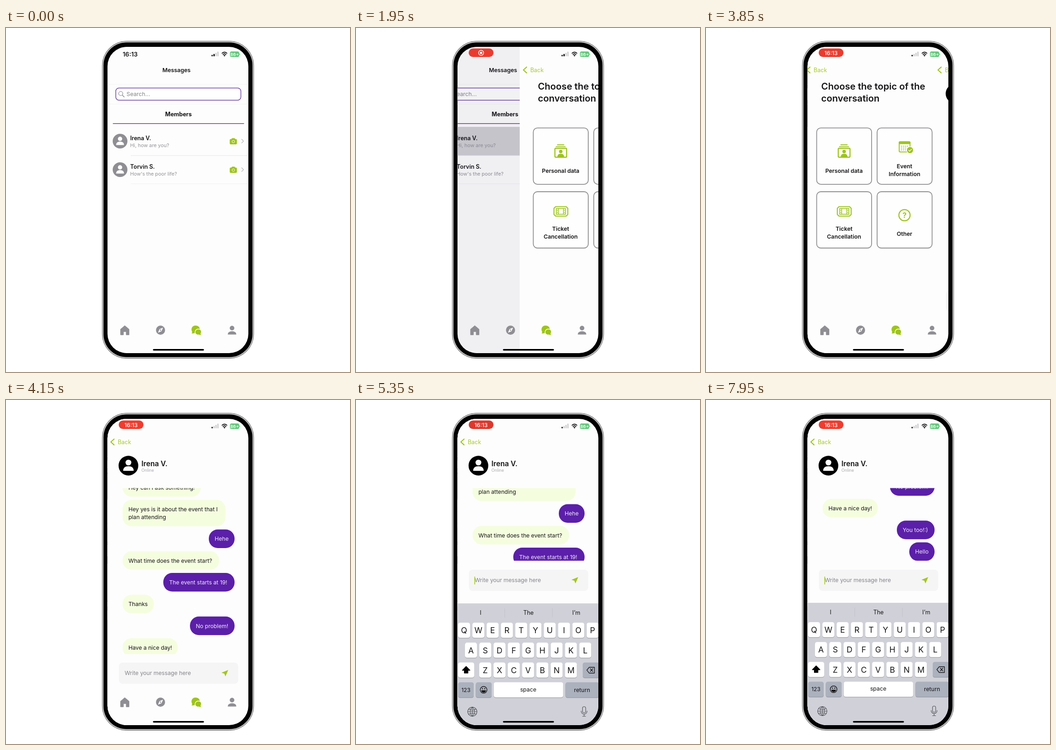
An HTML page for the animation above (8 s loop, 748x748 px).

```html
<!DOCTYPE html>
<html lang="en">
<head>
<meta charset="utf-8">
<title>Chat app demo</title>
<style>
  html, body { margin: 0; width: 100%; height: 100%; overflow: hidden; background: #fff; }
  svg { display: block; width: 100vw; height: 100vh; }
  text { font-family: Inter, Roboto, sans-serif; white-space: pre; }
</style>
</head>
<body>
<svg id="stage" viewBox="0 0 748 748"></svg>
<script>
const LOOP = 8000, STEP = 50, SCREEN_W = 306;
const GREEN = '#9ec41a', GRAY = '#8e8e93', PURPLE = '#5b1fa9', PAPER = '#fdfdfd', INK = '#151517';

// ---- markup helpers; text is placed by the vertical centre of its capitals ----
const text = (x, y, size, str, { fill = INK, weight = 400, anchor = 'start', id = '' } = {}) =>
  `<text id="${id}" x="${x}" y="${y + size * 0.36}" font-size="${size}" fill="${fill}" font-weight="${weight}" text-anchor="${anchor}">${str}</text>`;
const mid = (x, y, size, str, opts = {}) => text(x, y, size, str, { anchor: 'middle', ...opts });
const rect = (x, y, w, h, r, fill, extra = '') =>
  `<rect x="${x}" y="${y}" width="${w}" height="${h}" rx="${r}" fill="${fill}" ${extra}/>`;
const circle = (x, y, r, fill, extra = '') => `<circle cx="${x}" cy="${y}" r="${r}" fill="${fill}" ${extra}/>`;
const path = (d, fill, extra = '') => `<path d="${d}" fill="${fill}" ${extra}/>`;
const line = (d, color, width = 1) =>
  path(d, 'none', `stroke="${color}" stroke-width="${width}" stroke-linecap="round" stroke-linejoin="round"`);
const group = (id, body, extra = '') => `<g id="${id}" ${extra}>${body}</g>`;

const avatar = (x, y, scale, fill) => `<g transform="translate(${x} ${y}) scale(${scale})">
  ${circle(0, 0, 16, fill)}${circle(0, -5, 4.7, '#fff')}
  ${path('M-8.5 8.5c0-5.5 3.5-7.5 8.5-7.5s8.5 2 8.5 7.5z', '#fff')}</g>`;
const backButton = line('M235 85l-7 6.3 7 6.3', GREEN, 2.2) + text(243, 91.5, 12.4, 'Back', { fill: '#a6ca2c' });

// ---- message overview ----
function memberRow(y, name, note) {
  return avatar(248, y, 1, GRAY) +
    text(270, y - 7, 12.5, name, { weight: 600 }) +
    text(270, y + 9, 10.8, note, { fill: '#929297' }) +
    rect(486.5, y - 4.5, 15.5, 11.5, 2, GREEN) + rect(490.5, y - 6.5, 7.5, 4, 1.5, GREEN) +
    circle(494.3, y + 1, 2.8, 'none', 'stroke="#fff" stroke-width="1"') +
    line(`M512.5 ${y - 4}l4 4-4 4`, '#b9b9bd', 1.3);
}
const overview = rect(220, 41, 308, 667, 0, PAPER) +
  mid(370.7, 92, 12.4, 'Messages', { weight: 600 }) +
  line('M221 122.5H527M221 165.5H527', '#f3f3f4') +
  rect(238.7, 130.5, 272, 26.5, 7, '#fff', 'stroke="#6c45a8" stroke-width="1.5"') +
  circle(249.5, 142.5, 4.5, 'none', 'stroke="#85858a" stroke-width="1.2"') + line('M253 146l4 4', '#85858a', 1.3) +
  text(262, 144, 12.3, 'Search...', { fill: '#85858a' }) +
  mid(375, 187, 12.5, 'Members', { weight: 700 }) +
  line('M233 207.8H517', '#7338ae', 1.6) +
  rect(220, 215, 308, 62, 0, '#cfcfd4', 'id="highlight"') +
  memberRow(246, 'Irena V.', 'Hi, how are you?') +
  memberRow(308, 'Torvin S.', "How's the poor life?") +
  line('M272 277.3H525', '#e6e6e8') + line('M272 338.7H525', '#f0f0f1') +
  rect(220, 41, 308, 667, 0, '#1c0a3c', 'id="dim"');

// ---- topic picker ----
function card(x, y, icon, labels, labelY) {
  return rect(x + 1, y + 1, 119.5, 122.5, 9, '#fefefe', 'stroke="#909092" stroke-width="1.8"') + icon +
    labels.map((l, i) => mid(x + 60.5, labelY + i * 16.8, 12.3, l, { weight: 600 })).join('');
}
const personIcon = line('M302 254H316M299 257.8H319', GREEN, 1.8) +
  rect(296.5, 261.5, 25.5, 19.5, 2, 'none', `stroke="${GREEN}" stroke-width="2.4"`) +
  circle(309.2, 268.5, 3.8, GREEN) + path('M302 280c0-5 3-6.5 7.2-6.5s7.2 1.5 7.2 6.5z', GREEN);
let calendarIcon = rect(429, 247.5, 23.5, 22, 2, 'none', `stroke="${GREEN}" stroke-width="2"`) + rect(428, 246.5, 25.5, 6, 2, GREEN);
for (let i = 0; i < 12; i++) calendarIcon += rect(433 + i % 4 * 4.2, 256 + (i >> 2) * 4, 2, 2, 0, GREEN);
calendarIcon += circle(452.5, 265.5, 7.3, GREEN, 'stroke="#fff" stroke-width="1.2"') + line('M449.5 265.7l2.2 2.2 4-4.4', '#fff', 1.4);
let ticketIcon = line('M298 388.5H321L324.5 392V405.5L321 409H298L294.5 405.5V392Z', GREEN, 2.2) +
  rect(299.5, 392.5, 20, 12.5, 0, 'none', `stroke="${GREEN}" stroke-width="1.7"`) + line('M304 392.5V405M315 392.5V405', GREEN, 1.5);
for (const x of [301.8, 317.2]) ticketIcon += line(`M${x} 396.5h.01M${x} 401h.01`, GREEN, 2);
const otherIcon = circle(440.5, 407, 12.2, 'none', `stroke="${GREEN}" stroke-width="2.3"`) + mid(440.5, 407.2, 16, '?', { fill: GREEN, weight: 700 });

const topics = rect(220, 41, 308, 667, 0, PAPER) + backButton +
  text(259.5, 127, 20.1, 'Choose the topic of the', { weight: 600 }) +
  text(259.5, 153, 20.1, 'conversation', { weight: 600 }) +
  card(248.5, 216.3, personIcon, ['Personal data'], 311) +
  card(380, 216.3, calendarIcon, ['Event', 'Information'], 300.7) +
  card(248.5, 355, ticketIcon, ['Ticket', 'Cancellation'], 437) +
  card(380, 355, otherIcon, ['Other'], 447.5);

// ---- conversation: [own message, bubble width, lines] ----
const MESSAGES = [
  [0, 170, 'Hey can I ask something!'],
  [0, 224, 'Hey yes is it about the event that I', 'plan attending'],
  [1, 56, 'Hehe'], [0, 210, 'What time does the event start?'],
  [1, 155, 'The event starts at 19!'], [0, 68, 'Thanks'], [1, 97, 'No problem!'],
  [0, 120, 'Have a nice day!'], [1, 82, 'You too!:)'], [1, 55, 'Hello'],
];
let bubbleTop = 169.9;
const bubbles = MESSAGES.map(([own, w, ...lines], i) => {
  const h = 40.5 + (lines.length - 1) * 17, x = own ? 497 - w : 253.5, y = bubbleTop;
  bubbleTop += h + 6.8;
  return group('bubble' + i, rect(x, y, w, h, 19.5, own ? PURPLE : '#f5fddf') +
    lines.map((l, n) => text(x + 12.7, y + 20.5 + n * 17, 12.15, l, { fill: own ? '#f1e9fb' : INK })).join(''));
}).join('');
const chat = rect(220, 41, 308, 667, 0, PAPER) + backButton +
  avatar(266.2, 142.7, 1.34, '#000') +
  text(294.5, 138, 15.6, 'Irena V.', { weight: 600 }) + text(294.5, 153, 9, 'Online', { fill: '#a9a9ad' }) +
  `<g clip-path="url(#listClip)">${group('list', bubbles)}</g>` +
  group('composer', rect(245.5, 571, 259.5, 46, 8, '#f5f5f6') +
    text(258, 594, 12.2, '', { id: 'draft' }) +
    rect(257.3, 586, 1.8, 17, 0, '#acd030', 'id="caret"') +
    path('M468.5 593l14.7-6-6 14-2.5-6z', '#a3c61c'));

// ---- tab bar ----
const tabs = path('M249 655l9.3-7.8 9.3 7.8v12.2h-6.3v-7h-6v7H249z', GRAY, `stroke="${GRAY}" stroke-linejoin="round"`) +
  circle(336, 657, 9.9, GRAY) + path('M341.5 651.5l-3.3 7.7-7.7 3.3 3.3-7.7z', '#fff') + circle(336, 657, 1.4, GRAY) +
  path('M403.5 664c1.5-1.5 1.5-3 .8-4.5-2.8-6 1-12.5 7.7-12.5s9.5 4.5 9.5 8-3.5 8-9.5 8c-3 1-5.5 1.5-8.5 1z', GREEN) +
  path('M425.5 668.5c-3 .3-4.5-.3-6-1.2-4.5.7-8.5-2-8.5-6s3.3-6.8 7.3-6.8c6 0 8.5 6 5.5 10 0 1.5.5 2.7 1.7 4z', GREEN, `stroke="${PAPER}" stroke-width="1.4"`) +
  circle(491.5, 652.5, 5, GRAY) + path('M482.3 666.5c0-5 4-7 9.2-7s9.2 2 9.2 7z', GRAY);

// ---- keyboard ----
const KEY_GRAY = '#abb1bd', keys = {};
const keyCap = (x, y, w, fill, id = '') => rect(x, y + 1, w, 33, 4.5, '#8f9299') + rect(x, y, w, 33, 4.5, fill, `id="${id}"`);
[['qwertyuiop', 235, 483], ['asdfghjkl', 250, 526.3], ['zxcvbnm', 281, 569.5]].forEach(([row, x0, y]) =>
  [...row].forEach((ch, i) => keys[ch] = { x: x0 + i * 31.05, y }));
const letterCase = (id, change, size, dy) => group(id, Object.entries(keys).map(([ch, { x, y }]) =>
  mid(x, y + dy, size, change(ch))).join(''));
const letters = Object.values(keys).map(({ x, y }) => keyCap(x - 13, y, 26, '#fff')).join('') +
  letterCase('capitals', ch => ch.toUpperCase(), 17.5, 16.7) +
  letterCase('smallLetters', ch => ch, 19, 14.6);
const keyboard = rect(220, 441, 308, 270, 0, '#d0d1d8') +
  rect(323, 446, 104, 30, 5, '#e6e6ea', 'id="suggestionBox"') +
  line('M323.5 452V471M427 452V471', '#c2c3ca') +
  [271, 375, 479].map((x, i) => mid(x, 461.5, 12.5, '', { id: 'suggestion' + i })).join('') + letters +
  keyCap(222, 569.5, 35, '#fff', 'shiftKey') + path('M239.5 578l8.3 8.5h-4.3v6h-8v-6h-4.3z', '#000', 'id="shiftArrow" stroke="#000" stroke-width="1.3" stroke-linejoin="round"') +
  keyCap(493, 569.5, 36, KEY_GRAY) + line('M502 586l5-6h11.5v12.5H507zM509.5 583l5.5 6M515 583l-5.5 6', INK, 1.3) +
  keyCap(222, 612.5, 34, KEY_GRAY) + mid(239, 629, 12, '123') +
  keyCap(260.5, 612.5, 34.5, KEY_GRAY) + circle(277.5, 629, 7.3, 'none', `stroke="${INK}" stroke-width="1.4"`) +
  path('M272.5 630h10c0 6.5-10 6.5-10 0z', INK) + circle(275, 626.5, 1.2, INK) + circle(280, 626.5, 1.2, INK) +
  keyCap(299.5, 612.5, 151, '#fff') + mid(374.5, 628, 12.3, 'space') +
  keyCap(455.5, 612.5, 73, KEY_GRAY) + mid(491.5, 629, 12.3, 'return') +
  circle(253, 676.5, 10, 'none', 'stroke="#55575d" stroke-width="1.2"') +
  line('M243 676.5h20M253 666.5v20M253 666.5c-6.5 5-6.5 15 0 20M253 666.5c6.5 5 6.5 15 0 20M245 671c5 2.5 11 2.5 16 0M245 682c5-2.5 11-2.5 16 0', '#55575d', 1.1) +
  rect(492.5, 665.5, 7, 13.5, 3.5, 'none', 'stroke="#55575d" stroke-width="1.2"') +
  line('M489.5 675c0 9 13 9 13 0M496 682v4.5M492.5 686.5h7', '#55575d', 1.2) +
  group('popup', path('M-13 31v-26c0-7-10-6-10-13v-39q0-6 6-6h34q6 0 6 6v39c0 7-10 6-10 13v26q0 3-3 3h-20q-3 0-3-3z', '#fff', 'filter="url(#soft)"') +
    mid(0, -29.5, 30, '', { id: 'popupLetter' }));

// ---- status bar ----
const status = mid(270, 57, 13.4, '16:13', { weight: 600, id: 'clock' }) +
  group('pill', rect(245, 44.5, 54, 18.5, 9.2, '#ee3b2c', 'id="pillShape"') +
    mid(272, 54.2, 12.1, '16:13', { fill: '#fff', weight: 500, id: 'pillTime' }) +
    group('recordIcon', circle(272, 54, 5.5, 'none', 'stroke="#fff" stroke-width="1.4"') + circle(272, 54, 2.6, '#fff'))) +
  [3, 5, 7.5, 10].map((h, i) => rect(446.8 + i * 4.2, 61.5 - h, 2.9, h, 0.8, i ? '#cfcfd1' : INK, `id="bar${i}"`)).join('') +
  line('M469.8 54.8c3-3 7.5-3 10.5 0M472 57.5c1.8-1.7 4.3-1.7 6.2 0', INK, 1.9) + path('M472.8 59.5q2.2-1.8 4.5 0l-2.25 2.5z', INK) +
  rect(487, 51, 20, 12, 3.5, '#60c97a') + rect(507.7, 55, 1.3, 4, 0.6, '#60c97a') +
  mid(497, 57.2, 9.3, '86+', { fill: '#effbf0', weight: 700 });

document.getElementById('stage').innerHTML = `
  <defs>
    <clipPath id="screenClip">${rect(220.7, 41, 306.3, 666, 42, '#000')}</clipPath>
    <clipPath id="listClip"><rect id="listWindow" x="220" y="191.5" width="308" height="361"/></clipPath>
    <filter id="soft" x="-30%" y="-30%" width="160%" height="160%"><feDropShadow dx="0" dy="1" stdDeviation="1.5" flood-opacity=".25"/></filter>
  </defs>
  ${rect(209.3, 28.5, 329.4, 690, 53, '#8b8b8b', 'stroke="#737373" stroke-width="1"')}
  ${rect(211, 30.2, 326, 686.6, 51.5, 'none', 'stroke="#cacaca" stroke-width="1.8"')}
  ${rect(212, 31.5, 324, 684, 50, '#000')}
  <g clip-path="url(#screenClip)">
    ${group('overview', overview)}${group('topics', topics)}${group('chat', chat)}
    ${tabs}${group('keyboard', keyboard)}${status}
    ${rect(319.5, 698, 111, 3.6, 1.8, '#000')}
  </g>`;

// ---- timeline ----
const $ = id => document.getElementById(id);
const clamp = v => Math.min(1, Math.max(0, v));
const ramp = (t, from, to) => clamp((t - from) / (to - from));
const easeOut = p => 1 - (1 - p) ** 3;
const spring = t => t <= 0 ? 0 : 1 - (1 + 0.01826 * t) * Math.exp(-0.01826 * t);
const show = (id, on) => $(id).setAttribute('visibility', on ? 'inherit' : 'hidden');
const move = (id, x, y) => $(id).setAttribute('transform', `translate(${x} ${y})`);
const set = (id, attr, value) => $(id).setAttribute(attr, value);

const OPEN_TOPICS = 1848, OPEN_CHAT = 3840, FOCUS = 4940, SEND = 7350;
const TYPING = [
  [0, '', ['I', 'The', 'I’m']],
  [6150, 'H', ['“H”', 'He', 'Hey']],
  [6400, 'He', ['“He”', 'Hey', 'Hello']],
  [6550, 'Hel', ['“Hel”', 'He’ll', 'Hello']],
  [6700, 'Hell', ['“Hell”', 'Hello', 'He’ll']],
  [6950, 'Hello', ['“Hello”', 'Hello', 'Hellos']],
  [SEND, '', ['I', 'The', 'I’m']],
];
const typingAt = t => TYPING.findLast(([start]) => start <= Math.max(0, t));

function drawStatus(t) {
  const pill = ramp(t, 600, 850), icon = ramp(t, 900, 1100) * (1 - ramp(t, 3100, 3300));
  const glow = 0.5 + 0.5 * Math.cos((t - 4150) / 1900 * 2 * Math.PI);
  set('clock', 'opacity', 1 - pill);
  set('pill', 'opacity', pill);
  set('pillShape', 'fill', `rgb(${218 + 22 * glow},${55 + 5 * glow},${45 + glow})`);
  set('pillTime', 'opacity', 1 - icon);
  set('recordIcon', 'opacity', icon);
  set('bar1', 'fill', t < 3200 ? INK : '#cfcfd1');
}

function drawPages(t) {
  const first = spring(t - OPEN_TOPICS), second = easeOut(ramp(t, OPEN_CHAT, OPEN_CHAT + 300));
  show('highlight', t > 1650);
  set('dim', 'opacity', 0.1 * first);
  move('overview', -0.3 * SCREEN_W * first, 0);
  move('topics', SCREEN_W * (1 - first) - 0.3 * SCREEN_W * second, 0);
  move('chat', SCREEN_W * (1 - second), 0);
  show('topics', t > OPEN_TOPICS);
  show('chat', t > OPEN_CHAT);
}

function drawChat(t) {
  const lift = 202 * easeOut(ramp(t, FOCUS, FOCUS + 330));
  const scroll = 55 * easeOut(ramp(t, FOCUS, FOCUS + 330)) + 248 * easeOut(ramp(t, SEND + 30, SEND + 430));
  const draft = typingAt(t)[1];
  move('composer', 0, -lift);
  move('list', 0, -scroll);
  set('listWindow', 'height', 361 - lift * 1.005);
  show('bubble9', t >= SEND);
  $('draft').textContent = draft || 'Write your message here';
  set('draft', 'fill', draft ? INK : '#85858a');
  set('caret', 'x', 257.3 + (draft ? $('draft').getComputedTextLength() : 0));
  show('caret', t > FOCUS);
}

function drawKeyboard(t) {
  const caps = !typingAt(t - 110)[1], suggestions = typingAt(t - 80)[2];
  move('keyboard', 0, 268 * (1 - spring(t - FOCUS)));
  show('keyboard', t > FOCUS);
  show('capitals', caps);
  show('smallLetters', !caps);
  set('shiftKey', 'fill', caps ? '#fff' : KEY_GRAY);
  set('shiftArrow', 'fill', caps ? '#000' : 'none');
  suggestions.forEach((word, i) => $('suggestion' + i).textContent = word);
  show('suggestionBox', suggestions[1].startsWith('He') && suggestions[1].length > 3);

  const [pressed, word] = typingAt(t), letter = word.slice(-1);
  const popping = letter && t - pressed < 120;
  show('popup', popping);
  if (popping) {
    const { x, y } = keys[letter.toLowerCase()];
    move('popup', x, y);
    $('popupLetter').textContent = letter;
  }
}

// The picture advances in 50 ms steps, like a 20 fps screen recording.
function frame() {
  const t = Math.floor((performance.now() + 2) / STEP) * STEP % LOOP;
  drawStatus(t);
  drawPages(t);
  drawChat(t);
  drawKeyboard(t);
  requestAnimationFrame(frame);
}
frame();
</script>
</body>
</html>
```
